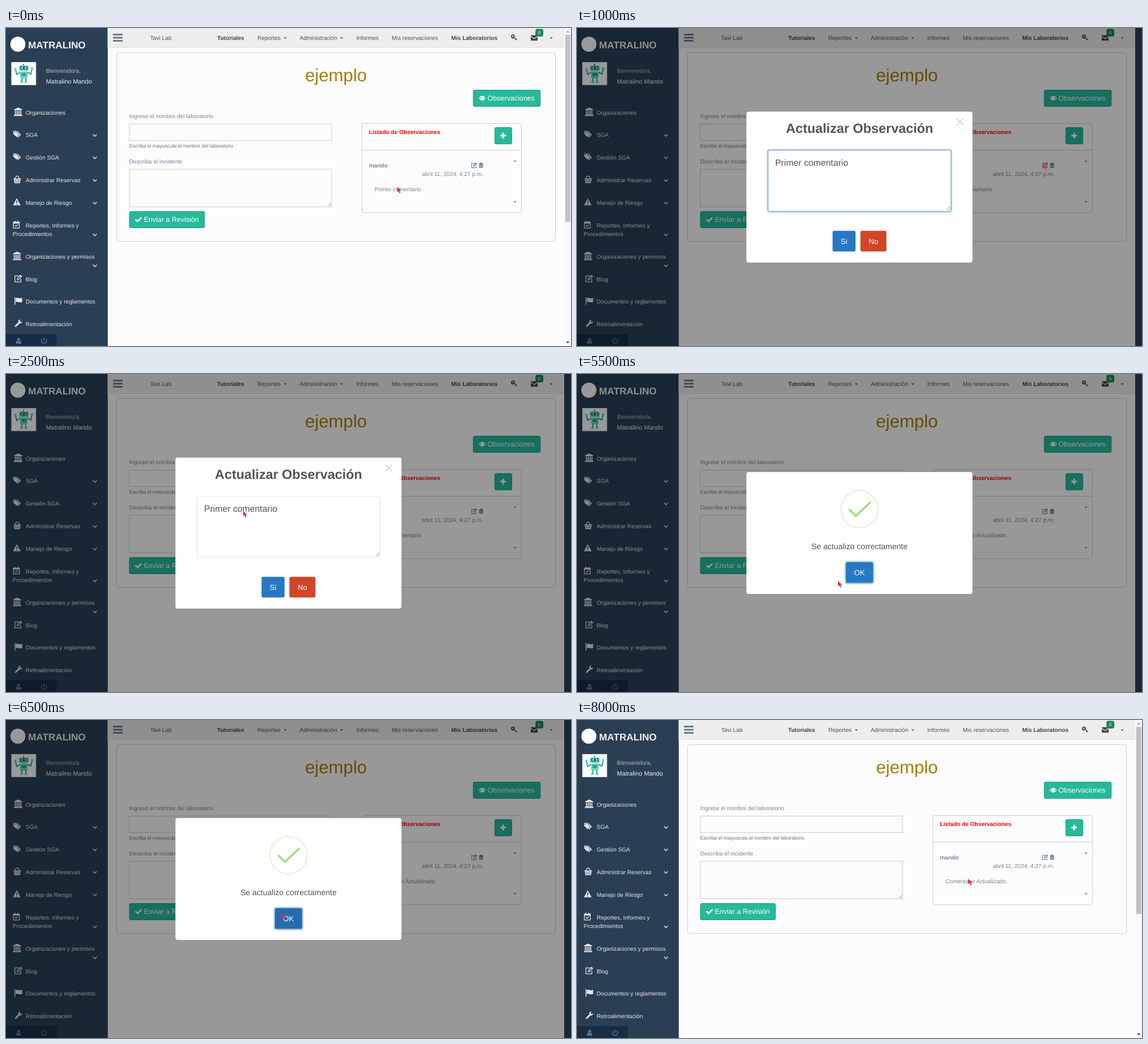
These frames come from a looping animation (998x561 px, 9000 ms). An HTML page:

```html
<!DOCTYPE html>
<html lang="es">
<head>
<meta charset="utf-8">
<title>Observaciones</title>
<style>
html, body { margin: 0; width: 100%; height: 100%; overflow: hidden; background: #fcfcfc; }
svg { display: block; width: 998px; height: 561px; font-family: "Liberation Sans", Arial, sans-serif; text-rendering: geometricPrecision; }
</style>
</head>
<body>
<svg id="stage" viewBox="0 0 998 561"></svg>
<script>
const BASE = 10.14, LARGE = 12.48;
const GREY = '#73879c', SLATE = '#5a738e', LIGHT = '#e7e7e7', NAV = '#515356', DARK = '#545454';

// Icon outlines in a 16 x 16 box, filled with the even-odd rule
const ICONS = {
  bank: 'M8 0 15.5 3.5V5H.5V3.5ZM2 6h2v6H2ZM5.3 6h2v6h-2ZM8.7 6h2v6h-2ZM12 6h2v6h-2ZM1 12.5h14v1.3H1ZM0 14.3h16V16H0Z',
  tags: 'M0 1V7L7 14 12 9 5 1ZM2.6 2.4a1.2 1.2 0 010 2.4 1.2 1.2 0 010-2.4ZM6.5 1H8.5L16 9 10 15 8.6 13.8 13 9Z',
  basket: 'M0 6H2.5L5.5 .5H10.5L13.5 6H16V8H0ZM4.3 6H11.7L9.6 2H6.4ZM1 8.6H15L13.7 16H2.3ZM4 10V14H5.2V10ZM7.4 10V14H8.6V10ZM10.8 10V14H12V10Z',
  warning: 'M8 0 16 15H0ZM7 5V10H9V5ZM7 11.3V13.3H9V11.3Z',
  calendar: 'M1 2H15V16H1ZM2.5 6V14.5H13.5V6ZM4 0H5.8V2H4ZM10.2 0H12V2H10.2ZM4.3 10 5.4 9 7.2 10.7 10.7 7.2 11.8 8.3 7.2 12.9Z',
  edit: 'M0 2H10L8.5 3.5H1.5V14.5H12.5V10L14 8.5V16H0ZM5 8 12.5 .5 16 4 8.5 11.5H5ZM6.5 8.7V10H7.8L13 4.8 11.7 3.5Z',
  flag: 'M0 0H1.7V16H0ZM2.6 2C6 -.5 8 4 16 1.5V10C9 13 7 8 2.6 10.5Z',
  wrench: 'M1 12.5 8 5.5C7 2 10 -.5 13 .5L10.5 3 13 5.5 15.5 3C16.5 6 14 9 10.5 8L3.5 15C1.5 16.5 -.5 14.5 1 12.5ZM2.7 12.5a.8 .8 0 010 1.6 .8 .8 0 010-1.6Z',
  user: 'M8 0a4 4 0 010 8.4 4 4 0 010-8.4ZM1 16V12C1 9 3 8 4.5 8Q8 10.5 11.5 8C13 8 15 9 15 12V16Z',
  power: 'M7 0H9V8H7ZM4.5 1.5V3.9A5.5 5.5 0 1011.5 3.9V1.5A7.5 7.5 0 114.5 1.5Z',
  key: 'M5 0a5 5 0 010 10 5 5 0 010-10ZM4.6 2.5a2 2 0 010 4 2 2 0 010-4ZM9 6.5 16 13 14.5 14.5 13 13.2 11.8 14.4 10.4 13 11.5 11.8 7.2 8.4Z',
  mail: 'M0 2H16V3.5L8 9 0 3.5ZM0 5.5 8 11 16 5.5V14.5H0Z',
  eye: 'M0 8C4 1 12 1 16 8 12 15 4 15 0 8ZM1.7 8C5 13 11 13 14.3 8 11 3 5 3 1.7 8ZM8 4.2a3.8 3.8 0 010 7.6 3.8 3.8 0 010-7.6Z',
  check: 'M0 8.5 2.4 6 6 9.7 13.6 2 16 4.4 6 14.5Z',
  plus: 'M5.7 0H10.3V5.7H16V10.3H10.3V16H5.7V10.3H0V5.7H5.7Z',
  trash: 'M0 3H4.5L5.5 .5H10.5L11.5 3H16V4.6H0ZM2 5H14V16H2ZM4.5 7V14H5.7V7ZM7.4 7V14H8.6V7ZM10.3 7V14H11.5V7Z'
};

const rect = (x, y, w, h, fill, extra = '') =>
  `<rect x="${x}" y="${y}" width="${w}" height="${h}" fill="${fill}" ${extra}/>`;
const path = (d, fill, extra = '') => `<path d="${d}" fill="${fill}" ${extra}/>`;
const stroke = (d, color, width, extra = '') =>
  path(d, 'none', `stroke="${color}" stroke-width="${width}" ${extra}`);
// y is the middle of the capital letters
const text = (x, y, content, fill, size = BASE, extra = '') =>
  `<text x="${x}" y="${y + size * .36}" fill="${fill}" font-size="${size}" ${extra}>${content}</text>`;
const icon = (name, x, y, size, fill) =>
  path(ICONS[name], fill, `fill-rule="evenodd" transform="translate(${x - size / 2} ${y - size / 2}) scale(${size / 16})"`);
const frame = (x, y, w, h, color, r = 0) =>
  rect(x, y, w, h, 'none', `stroke="${color}" rx="${r}"`);
const button = (x, y, w, h) => rect(x, y, w, h, '#26b99a', 'stroke="#169f85" rx="2.3"');
const caret = (x, y) => path(`M${x} ${y}h5.2l-2.6 2.8Z`, NAV);
const grip = (x, y) => stroke(`M${x - 6} ${y}l6-6M${x - 2.5} ${y}l2.5-2.5`, '#777', .8);
const BOLD = 'font-weight="bold"', MIDDLE = 'text-anchor="middle"', END = 'text-anchor="end"';

function sidebar() {
  const rows = [
    ['bank', 21.5, 149, 'Organizaciones'],
    ['tags', 19.5, 188.8, 'SGA', 189.5],
    ['tags', 19.5, 228.6, 'Gestión SGA', 229],
    ['basket', 19.8, 268.4, 'Administrar Reservas', 269],
    ['warning', 19, 308.2, 'Manejo de Riesgo', 308.8],
    ['calendar', 18.3, 348, 'Reportes, Informes y', 365],
    ['bank', 19.5, 403.3, 'Organizaciones y permisos', 419.5],
    ['edit', 21.8, 443, 'Blog'],
    ['flag', 21.8, 482.8, 'Documentos y reglamentos'],
    ['wrench', 21.8, 522.6, 'Retroalimentación']
  ];
  return rect(0, 0, 179.5, 561, '#2a3f54')
    + '<circle cx="21" cy="28.5" r="13.3" fill="#fff"/>'
    + text(39, 29.5, 'MATRALINO', '#ecf0f1', 17.16, BOLD)
    + robot()
    + text(70.5, 75.3, 'Bienvenido/a,', '#bab8b8')
    + text(70.5, 93.8, 'Matralino Mando', '#ecf0f1', 10.92)
    + rows.map(([name, x, y, label, chevron]) =>
        icon(name, x, y - 1.3, name === 'bank' ? 15 : 13.5, LIGHT) + text(34.7, y, label, LIGHT)
        + (chevron ? stroke(`M153.7 ${chevron - 1.8}l3.3 3.3 3.3-3.3`, '#c4cfda', 1.7) : '')).join('')
    + text(11.7, 363.7, 'Procedimientos', LIGHT)
    + rect(0, 540, 89.5, 21, '#172d44')
    + icon('user', 22.3, 551.8, 10.5, SLATE) + icon('power', 67.2, 551.8, 11.5, SLATE);
}

function robot() {
  const teal = '#5fd9c0', deep = '#2a9d8f';
  return rect(9.8, 60.5, 43, 39.8, '#fff', 'stroke="#d5d9de"')
    + stroke('M31 66v-3M25 78 19 82 17 74M37 78l7 3 2-9M28 89v7M35 89v7', deep, 2)
    + rect(23, 66, 17, 10, teal, 'rx="2.5"') + rect(25, 68, 13, 5, '#2b5960', 'rx="2"')
    + '<circle cx="28.5" cy="70.5" r="1.4" fill="#fff"/><circle cx="34.5" cy="70.5" r="1.4" fill="#fff"/>'
    + rect(25, 77, 13, 12, teal, 'rx="2"') + rect(27.5, 79.5, 8, 5, deep)
    + rect(14.5, 70, 4, 5, teal, 'rx="1"') + rect(44, 69, 4, 5, teal, 'rx="1"')
    + rect(25, 94, 5, 3, teal) + rect(33, 94, 5, 3, teal);
}

function topBar() {
  return rect(179.5, 0, 806.5, 35, '#ededed') + rect(179.5, 34.2, 806.5, .8, '#d9dee4')
    + [10.3, 15.8, 21.3].map(y => rect(189, y, 17, 2.7, SLATE, 'rx=".8"')).join('')
    + text(254.8, 17.7, 'Tavi Lab', NAV)
    + text(373, 17.7, 'Tutoriales', '#444', BASE, BOLD)
    + text(444, 17.7, 'Reportes', NAV) + caret(490.8, 16.5)
    + text(518.7, 17.7, 'Administración', NAV) + caret(590.4, 16.5)
    + text(618.7, 17.7, 'Informes', NAV)
    + text(681.5, 17.7, 'Mis reservaciones', NAV)
    + text(786.5, 17.7, 'Mis Laboratorios', '#444', BASE, BOLD)
    + icon('key', 897.5, 17, 11, '#444') + icon('mail', 933, 17.3, 12, '#444')
    + rect(935.2, 1.5, 13.8, 13.5, '#198754', 'rx="3.5"')
    + text(942.1, 8.3, '0', '#fff', 8, MIDDLE)
    + caret(960.5, 16.5);
}

function content() {
  return frame(195.3, 43.2, 775.2, 333.5, '#cdcdcd', 4)
    + text(582.8, 82.4, 'ejemplo', '#a67c0a', 31.2, MIDDLE)
    + button(825.3, 109.5, 118.5, 28.8) + icon('eye', 841.2, 123.8, 12.5, '#fff')
    + text(850.6, 123.8, 'Observaciones', '#fff', LARGE)
    + text(217.5, 155.7, 'Ingrese el nombre del laboratorio', GREY)
    + frame(217.8, 169.5, 357.4, 29, '#ccc')
    + text(217.5, 208.3, 'Escriba el mayuscula el nombre del laboratorio', '#6c757d', 8.87)
    + text(217.5, 235.3, 'Describa el incidente', GREY)
    + frame(217.8, 249.2, 357.4, 66.3, '#ccc') + grip(574, 314.5)
    + button(218, 323.7, 132.6, 28.8) + icon('check', 234, 338, 12.5, '#fff')
    + text(243.5, 338, 'Enviar a Revisión', '#fff', LARGE)
    + frame(628.7, 168.5, 281.6, 157.3, '#cdcdcd', 4)
    + rect(628.7, 215, 281.6, .9, '#c4c4c4')
    + text(641, 183, 'Listado de Observaciones', '#f00', BASE, BOLD)
    + button(863.4, 175.6, 30, 29) + icon('plus', 878.2, 189.7, 10, '#fff')
    + text(641, 242, 'mando', GREY, BASE, BOLD)
    + icon('edit', 827, 242, 10, SLATE) + icon('trash', 839.2, 242, 9, SLATE)
    + text(843, 257, 'abril 11, 2024, 4:27 p.m.', GREY, BASE, END)
    + text(650.7, 284.2, '', GREY, BASE, 'id="comment"')
    + path('M896.2 236h6l-3-3.2ZM896.2 305.3h6l-3 3.2Z', '#999');
}

const scrollbar = () => '<g id="scrollbar">' + rect(986, 0, 12, 561, '#f9f9f9')
  + rect(987.8, 12, 9, 330, '#c1c1c1')
  + path('M989 8h6.4l-3.2-3.6Z', '#a3a3a3') + path('M989 553h6.4l-3.2 3.6Z', '#505050') + '</g>';

const dialogButton = (id, x, y, w, fill, label) =>
  rect(x, y, w, 36.5, fill, 'rx="3.2"')
  + rect(x, y, w, 36.5, '#000', `id="${id}" rx="3.2" opacity=".1"`)
  + text(x + w / 2, y + 18.2, label, '#fff', 13.15, MIDDLE);

function editDialog() {
  return '<g id="editDialog">' + rect(299.3, 147.5, 399.2, 266.3, '#fff', 'rx="4"')
    + text(499, 176.6, 'Actualizar Observación', DARK, 23.4, `${BOLD} ${MIDDLE}`)
    + stroke('M670.3 159.8l11.6 11.6M681.9 159.8l-11.6 11.6', '#ccc', 1.4)
    + rect(337.8, 215.8, 322.5, 107.2, '#fff', 'stroke="#d9d9d9" stroke-width=".8" rx="2.3"')
    + '<g id="focusRing">' + frame(338, 216, 322, 107, '#b4dbed', 2.3)
    + rect(336.7, 214.7, 324.8, 109.5, 'none', 'stroke="#6496c8" stroke-opacity=".5" stroke-width="2.6" rx="3.5"') + '</g>'
    + grip(659, 321.2)
    + text(350, 237, '', DARK, 15.8, 'id="field"')
    + rect(479, 228, 1, 18, DARK, 'id="fieldCaret"')
    + dialogButton('yesHover', 451.4, 357.8, 40.6, '#2778c4', 'Si')
    + dialogButton('noHover', 500.6, 357.8, 46, '#d14529', 'No') + '</g>';
}

function doneDialog() {
  return '<g id="doneDialog">' + rect(299.3, 173, 399.2, 215, '#fff', 'rx="4"')
    + '<circle cx="499" cy="238.4" r="32.8" fill="none" stroke="#a5dc86" stroke-opacity=".3" stroke-width="2.6"/>'
    + stroke('M481.5 239.5 492.5 250.5 517.5 227', '#a5dc86', 3.7, 'stroke-linecap="round"')
    + text(499, 303.8, 'Se actualizo correctamente', DARK, 14.04, MIDDLE)
    + rect(473.8, 330.9, 50.4, 38.9, 'none', 'stroke="#6496c8" stroke-opacity=".5" stroke-width="2.4" rx="4"')
    + dialogButton('okHover', 475, 332.1, 48, '#2778c4', 'OK') + '</g>';
}

const $ = id => document.getElementById(id);
$('stage').innerHTML = rect(0, 0, 998, 561, '#2a3f54') + rect(179.5, 0, 806.5, 561, '#fcfcfc')
  + sidebar() + topBar() + content() + scrollbar()
  + rect(0, 0, 998, 561, '#000', 'id="shade" opacity=".4"')
  + editDialog() + doneDialog()
  + path('M0 0V9.6L2.2 7.7 4 11.8 5.9 11 4.2 7.1 7.2 6.9Z', '#dc3545', 'id="pointer"');

const pointerStops = [[0, 691, 280], [500, 823.5, 239], [2000, 419, 241.5],
  [5000, 461, 365], [6500, 487.3, 340.5], [8000, 691, 280]];
const show = (id, visible) => $(id).setAttribute('visibility', visible ? 'inherit' : 'hidden');

function render() {
  const t = performance.now() % 9000;
  const during = (from, to) => t >= from && t < to;
  const before = 'Primer comentario', after = 'Comentario Actualizado.';

  $('comment').textContent = t < 5500 ? before : after;
  $('field').textContent = t < 4000 ? before : after;
  $('fieldCaret').setAttribute('x', t < 4000 ? 479 : 521);
  show('scrollbar', !during(1000, 7000));
  show('shade', during(1000, 7000));
  show('editDialog', during(1000, 5500));
  show('doneDialog', during(5500, 7000));
  show('focusRing', !during(2500, 4000));
  show('fieldCaret', during(1500, 2000) || during(4000, 5000));
  show('yesHover', t >= 5000);
  show('noHover', false);
  show('okHover', t >= 6500);
  // Nested parts must not outlive their dialog
  if (!during(1000, 5500)) $('editDialog').setAttribute('display', 'none');
  else $('editDialog').removeAttribute('display');

  const [, x, y] = pointerStops.filter(stop => stop[0] <= t).pop();
  $('pointer').setAttribute('transform', `translate(${x} ${y})`);
  requestAnimationFrame(render);
}
render();
</script>
</body>
</html>
```
